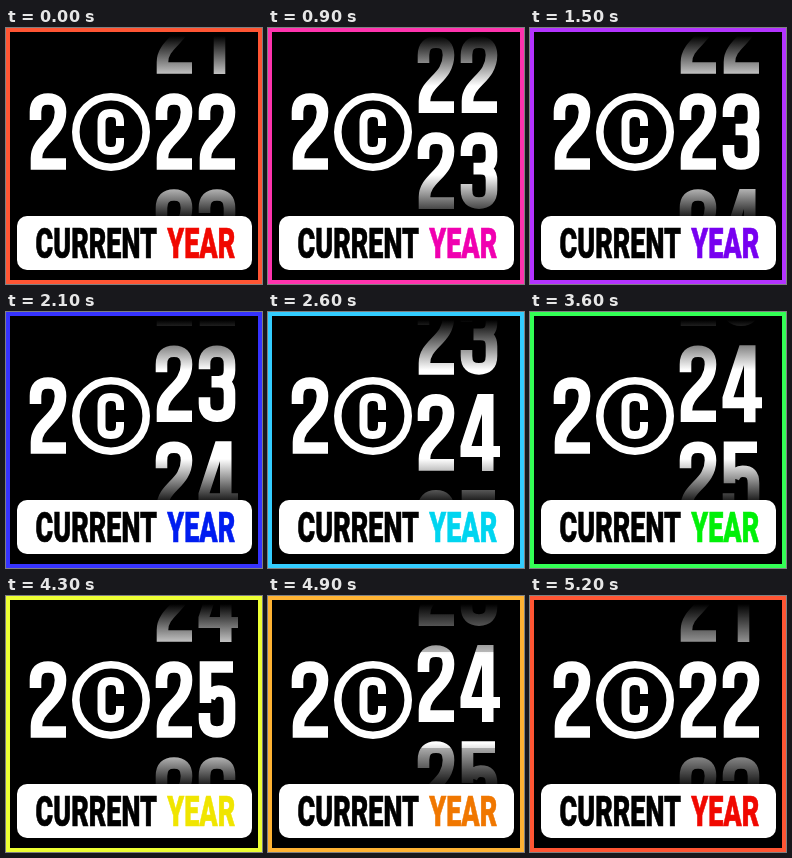
Animation of 256x256 px, one loop 5.4 s. Source, as an HTML page:

```html
<!DOCTYPE html>
<html lang="en">
<head>
<meta charset="utf-8">
<title>Current year</title>
<style>
  html, body { margin: 0; width: 100%; height: 100%; overflow: hidden; background: #000; }
  svg { display: block; width: 100%; height: 100%; --edge: hsl(10 100% 60%); --word: hsl(2 100% 47%); }
  .line { fill: none; stroke: #fff; stroke-width: 11.6; }
  .edge { fill: none; stroke: var(--edge); stroke-width: 4; }
  .label { font: 900 43px Roboto, Inter, sans-serif; text-anchor: middle; stroke-width: .7; }
  .word { fill: var(--word); stroke: var(--word); }
</style>
</head>
<body>
<svg viewBox="0 0 256 256">
  <defs>
    <!-- digits in a 37 x 77 cell -->
    <path id="d1" class="line" d="M9 15Q20 14 21 0V77"/>
    <path id="d2" class="line" d="M6 27V19C6 10 10.5 6 18.5 6S31 10 31 19C31 42 7 46 7 65V71H36.5"/>
    <path id="d3" class="line" d="M6 24V19C6 10 10.5 6 18.5 6S31 10 31 19V25C31 33 27 36.5 20 36.5H13H20C28 36.5 31 41 31 48V58C31 67 26.5 71 18.5 71S6 67 6 58V52"/>
    <path id="d4" fill="#fff" fill-rule="evenodd" d="M17 0H33V52H39.5V63H33V77H21.5V63H0V52ZM21.5 52V20L11 52Z"/>
    <path id="d5" class="line" d="M34.5 6H7V42M11 37C13 32 16 30 20 30C28 30 31 34 31 42V58C31 67 26.5 71 18.5 71S6 67 6 58V52"/>
    <path id="d6" class="line" d="M31 23V19C31 10 27 6 18.5 6S6 10 6 19V58C6 67 10.5 71 18.5 71S31 67 31 58V45C31 37 27 33 20 33S6 37 6 45"/>
    <linearGradient id="fade" gradientUnits="userSpaceOnUse" x1="0" y1="0" x2="0" y2="200">
      <stop offset=".04" stop-color="#000"/>
      <stop offset=".29" stop-color="#fff"/>
      <stop offset=".735" stop-color="#fff"/>
      <stop offset=".97" stop-color="#000"/>
    </linearGradient>
    <mask id="window" maskUnits="userSpaceOnUse" x="0" y="0" width="256" height="200" style="mask-type: luminance">
      <rect width="256" height="200" fill="url(#fade)"/>
    </mask>
  </defs>

  <rect width="256" height="256"/>
  <g mask="url(#window)"><g id="reel"></g></g>
  <path id="shade" d="M146 4H238V56H146ZM146 152H238V188H146Z" opacity="0"/>

  <use href="#d2" x="23.5" y="65"/>
  <circle class="line" cx="105" cy="104" r="35.2" style="stroke-width: 7.6"/>
  <path class="line" style="stroke-width: 8" d="M114 98V94C114 88 111 85 104.8 85S95.5 88 95.5 94V114C95.5 120 98.5 123 104.8 123S114 120 114 114V110"/>

  <rect x="11" y="188" width="235" height="54" rx="10" fill="#fff"/>
  <g class="label">
    <text transform="translate(90.3 229.5) scale(.627 1)" stroke="#000">CURRENT</text>
    <text class="word" transform="translate(195.3 229.5) scale(.627 1)">YEAR</text>
  </g>
  <rect class="edge" x="2" y="2" width="252" height="252"/>
</svg>
<script>
  const PITCH = 96, STEPS = 40, FIRST = 22;
  const svg = document.querySelector('svg');
  const reel = document.getElementById('reel');
  const shade = document.getElementById('shade');

  function addDigit(digit, x, y) {
    const use = document.createElementNS(svg.namespaceURI, 'use');
    use.setAttribute('href', '#d' + digit);
    use.setAttribute('x', x);
    use.setAttribute('y', y);
    reel.append(use);
  }
  for (let year = 21; year <= 26; year++) {
    const y = 65 + (year - FIRST) * PITCH;
    addDigit(2, 149.5, y);
    addDigit(year % 10, 192.5, y);
  }

  // Each year rolls in quick steps, then rests for three slow ones.
  const hold = i => i === 0 ? 500 : i % 12 >= 9 || i === STEPS - 1 ? 200 : 100;
  const ends = [];
  let total = 0;
  for (let i = 0; i < STEPS; i++) ends.push(total += hold(i));

  // Progress of a roll between two steps, slightly eased out.
  function roll(i, from, to) {
    const t = Math.min(1, Math.max(0, (i - from) / (to - from)));
    return t + 0.15 * t * (1 - t);
  }

  function draw(now) {
    const time = now % total;
    const i = ends.findIndex(end => time < end);
    const rows = roll(i, 0, 9) + roll(i, 11, 21) + roll(i, 23, 33) - 3 * roll(i, 35, 39);
    const hue = 370 - 360 * i / (STEPS - 1);
    reel.setAttribute('transform', `translate(0 ${-rows * PITCH})`);
    shade.setAttribute('opacity', i >= 36 ? 0.25 : 0);
    svg.style.setProperty('--edge', `hsl(${hue} 100% 60%)`);
    svg.style.setProperty('--word', `hsl(${hue - 8} 100% 47%)`);
    requestAnimationFrame(draw);
  }
  draw(performance.now());
</script>
</body>
</html>
```
